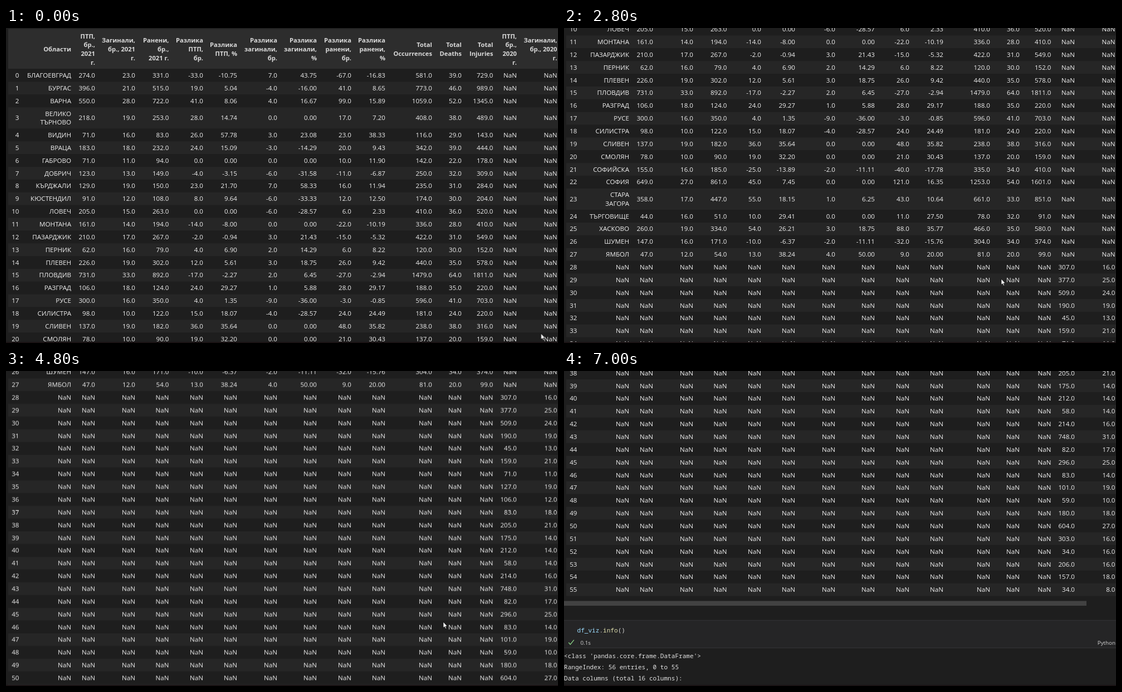
Recreate the animation shown at these times as an HTML page. Size 991 by 565 pixels, loop 8.47 s.

```html
<!DOCTYPE html>
<html lang="bg">
<head>
<meta charset="utf-8">
<title>df_viz</title>
<style>
  html, body { margin: 0; width: 100%; height: 100%; overflow: hidden; background: #1e1e1e; }
  svg { display: block; width: 991px; height: 565px; }
  text { font: 11.6px "Open Sans", "Noto Sans", sans-serif; fill: #f0f0f0; white-space: pre; }
  .head { font-weight: 700; font-size: 11.2px; fill: #dadada; }
  .end { text-anchor: end; }
  .mono { font: 11.08px "Noto Sans Mono", "DejaVu Sans Mono", monospace; fill: #e2e2e2; }
  .small { font-size: 9.8px; fill: #d4d4d4; }
</style>
</head>
<body>
<svg viewBox="0 0 991 565">
  <g id="page"></g>
  <path id="cursor" d="M0 0V10.6L2.4 8.5 4 12.3 5.7 11.6 4.1 7.9H7.3Z" fill="#fff" stroke="#000" stroke-width=".7"/>
  <rect y="563" width="991" height="2" fill="#1a1314"/>
</svg>
<script>
const LOOP = 8470, TICK = 200 / 3, NOTCH = 54.5;
const ROW = 22.86, TALL_ROW = 38.3, LINE = 15.7;

// region and its accidents in 2021
const regions = `БЛАГОЕВГРАД 274, БУРГАС 396, ВАРНА 550, ВЕЛИКО|ТЪРНОВО 218, ВИДИН 71, ВРАЦА 183,
ГАБРОВО 71, ДОБРИЧ 123, КЪРДЖАЛИ 129, КЮСТЕНДИЛ 91, ЛОВЕЧ 205, МОНТАНА 161, ПАЗАРДЖИК 210,
ПЕРНИК 62, ПЛЕВЕН 226, ПЛОВДИВ 731, РАЗГРАД 106, РУСЕ 300, СИЛИСТРА 98, СЛИВЕН 137, СМОЛЯН 78,
СОФИЙСКА 155, СОФИЯ 649, СТАРА|ЗАГОРА 358, ТЪРГОВИЩЕ 44, ХАСКОВО 260, ШУМЕН 147, ЯМБОЛ 47`
  .split(",").map(entry => entry.trim().split(" "));

// right edge and title
const columns = [
  [23.5, ""], [117, "Области"], [160, "ПТП,|бр.,|2021|г."], [232, "Загинали,|бр., 2021|г."],
  [292.5, "Ранени,|бр.,|2021 г."], [354, "Разлика|ПТП,|бр."], [415, "Разлика|ПТП, %"],
  [487, "Разлика|загинали,|бр."], [558, "Разлика|загинали,|%"], [620, "Разлика|ранени,|бр."],
  [681, "Разлика|ранени,|%"], [765, "Total|Occurrences"], [818, "Total|Deaths"],
  [874.5, "Total|Injuries"], [917, "ПТП,|бр.,|2020|г."], [989.5, "Загинали,|бр., 2020|г."]
];

const page = document.getElementById("page");

function add(tag, attrs, content = "", parent = page) {
  const el = document.createElementNS("http://www.w3.org/2000/svg", tag);
  for (const key in attrs) el.setAttribute(key, attrs[key]);
  el.textContent = content;
  return parent.appendChild(el);
}
const rect = (x, y, width, height, fill) => add("rect", { x, y, width, height, fill });
const label = (x, middle, content, cls) => add("text", { x, y: middle + 4.1, class: cls }, content);

function cell(x, middle, content, cls = "end") {
  const lines = content.split("|");
  lines.forEach((line, i) => label(x, middle + (i - (lines.length - 1) / 2) * LINE, line, cls));
}

function codeCell(y, tokens) {
  rect(0, y - 17.5, 991, 49.5, "#252526");
  for (const edge of [y - 18, y + 31.5]) rect(0, edge, 991, 1, "#37373a");
  const code = label(23.5, y, "", "mono");
  for (const [content, fill] of tokens) add("tspan", { style: `fill:${fill}` }, content, code);
  add("path", { d: `M8.3 ${y + 22.3}l3 3.4 6.6-8`, fill: "none", stroke: "#89d185", "stroke-width": 1.3 });
  label(29.5, y + 21.8, "0.1s", "small");
  label(990, y + 21.8, "Python", "small end");
}

let seed = 7;
function random(min, max) {
  seed = seed * 16807 % 2147483647;
  return min + (max - min) * seed / 2147483647;
}

// Accidents, deaths and injuries for 2021 and 2020.
function counts(accidents) {
  const before = Math.round(accidents - Math.sqrt(accidents) * random(-2, 3.5));
  const deaths = () => Math.round(random(5, 16) + accidents * 0.03);
  const injuries = n => Math.round(n * random(1.15, 1.35));
  return [
    [accidents, deaths(), injuries(accidents)],
    [before, deaths(), injuries(before)]
  ];
}

// Unmatched keys leave one block of rows per year, padded with NaN.
function tableRows() {
  const fixed = n => n.toFixed(1);
  const pairs = regions.map(([, accidents]) => counts(Number(accidents)));
  const first = pairs.map(([now, before], i) => [
    regions[i][0], ...now.map(fixed),
    ...now.flatMap((n, k) => [fixed(n - before[k]), (100 * (n / before[k] - 1)).toFixed(2)]),
    ...now.map((n, k) => fixed(n + before[k])), "NaN", "NaN"
  ]);
  const second = pairs.map(([, before]) => [
    ...Array(13).fill("NaN"), ...before.slice(0, 2).map(fixed)
  ]);
  return [...first, ...second];
}

function drawTable() {
  rect(4, 1.5, 987, 71.5, "#2d2d2d");
  for (const [x, title] of columns) cell(x, 38, title, "head end");
  let top = 73.55;
  tableRows().forEach((values, i) => {
    const height = values[0].includes("|") ? TALL_ROW : ROW;
    if (i % 2) rect(4, top, 987, height, "#262626");
    [String(i), ...values].forEach((value, k) => cell(columns[k][0], top + height / 2, value));
    top += height;
  });
}

const blue = "#9cdcfe", plain = "#d4d4d4", yellow = "#dcdcaa";
codeCell(-39.7, [["df_viz", blue]]);
drawTable();
rect(0, 1393.5, 938, 8.5, "#424242");
codeCell(1445.7, [["df_viz", blue], [".", plain], ["info", yellow], ["()", plain]]);
["<class 'pandas.core.frame.DataFrame'>", "RangeIndex: 56 entries, 0 to 55", "Data columns (total 16 columns):"]
  .forEach((line, i) => label(0, 1491.5 + 20 * i, line, "mono"));

// Each step is [tick, x, y]; the position holds until the next step.
function hold(el, steps) {
  const frames = steps.map(([tick, x, y]) => ({
    offset: Math.round(tick * TICK / 10) * 10 / LOOP,
    transform: `translate(${x}px, ${y}px)`,
    easing: "steps(1, end)"
  }));
  frames.push({ ...frames[frames.length - 1], offset: 1 });
  el.animate(frames, { duration: LOOP, iterations: Infinity });
}

// Eased quadratic curve, one step per tick.
function glide(firstTick, count, from, via, to) {
  return Array.from({ length: count }, (_, i) => {
    const u = (i + 1) / count, p = u * u * (3 - 2 * u), q = 1 - p;
    return [firstTick + i, ...[0, 1].map(k => q * q * from[k] + 2 * p * q * via[k] + p * p * to[k])];
  });
}

// The wheel goes one notch up, then down one notch at each of these ticks.
const wheelDown = [26, 29, 31, 32, 40, 41, 42, 49, 50, 58, 59, 66, 67, 72, 73, 79, 81, 84, 86];
hold(page, [[0, 0, 0], [22, 0, NOTCH], ...wheelDown.map((tick, i) => [tick, 0, -NOTCH * i])]);

hold(document.getElementById("cursor"), [
  [0, 960.5, 548],
  ...glide(1, 2, [960.5, 548], [959, 548.2], [957.5, 548.2]),
  ...glide(4, 9, [957.5, 548.2], [865, 495], [781, 450]),
  [33, 785, 450],
  ...glide(89, 13, [785, 450], [500, 353], [84.5, 540.5]),
  ...glide(102, 4, [84.5, 540.5], [60, 551], [46, 566])
]);
</script>
</body>
</html>
```
